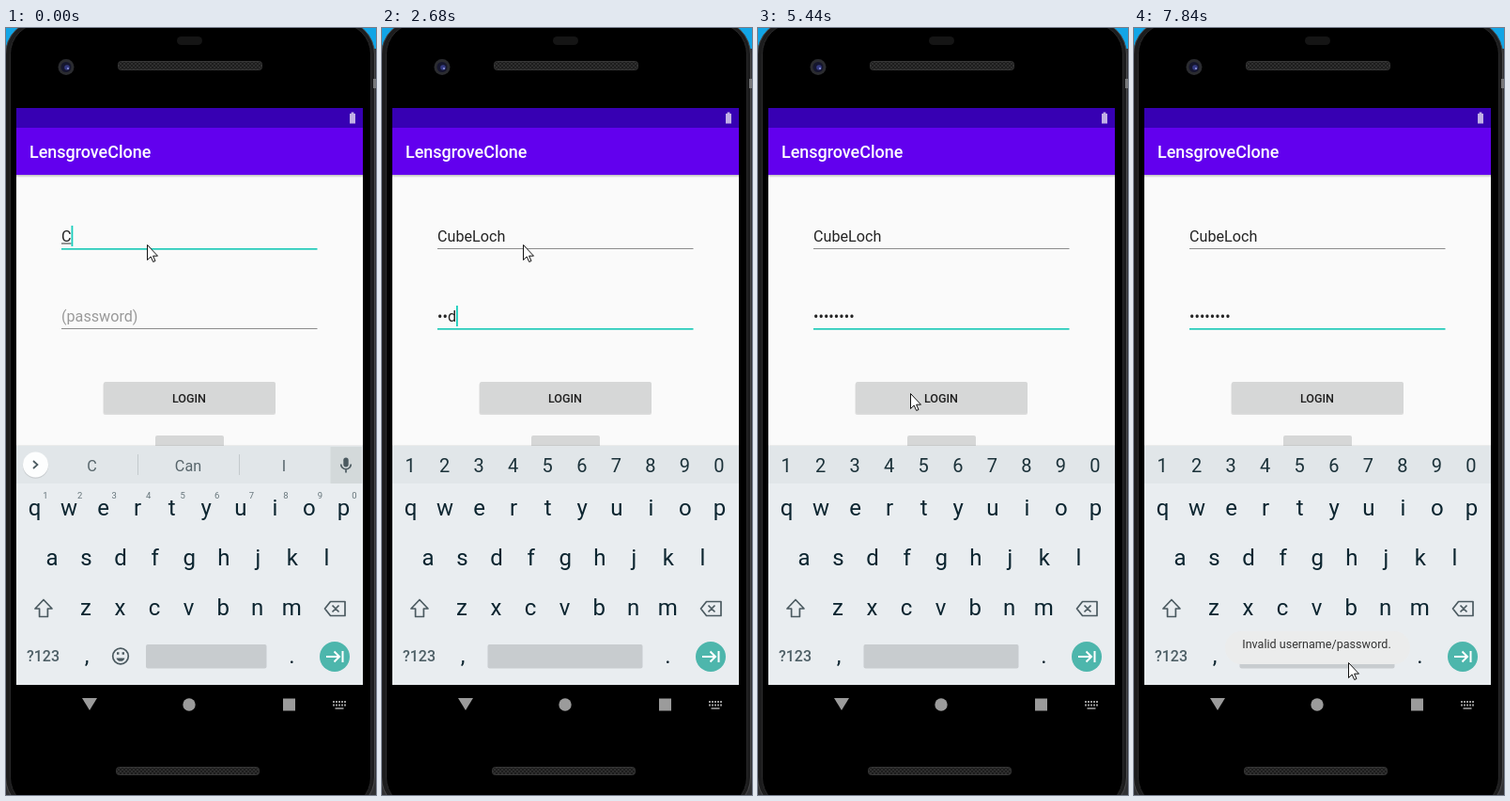
Recreate the animation shown at these times as an HTML page. Size 394x815 px, loop 7.99 s.

```html
<!DOCTYPE html>
<html lang="en">
<head>
<meta charset="utf-8">
<title>Login form</title>
<style>
  html, body { margin: 0; width: 100%; height: 100%; overflow: hidden; background: #000; }
  svg { display: block; width: 100vw; height: 100vh; font-family: Roboto, sans-serif; }
  .mid { text-anchor: middle; }
  .field { font-size: 16.16px; fill: #242424; white-space: pre; }
  .key { font-size: 24px; fill: #0c2530; }
  .digit { font-size: 20px; fill: #1c323a; }
  .hint { font-size: 9.5px; fill: #66757b; }
  .chip { font-size: 16.2px; fill: #57656b; }
  .icon { fill: none; stroke: #4b5a60; stroke-width: 1.7; }
</style>
</head>
<body>
<svg viewBox="0 0 394 815" preserveAspectRatio="none">
  <defs>
    <pattern id="mesh" width="4" height="4" patternUnits="userSpaceOnUse">
      <rect width="4" height="4" fill="#1d1d1d"/>
      <path d="M0 0L4 4M4 0L0 4" stroke="#343434" stroke-width=".8"/>
    </pattern>
    <linearGradient id="drop" x2="0" y2="1">
      <stop stop-color="#000" stop-opacity=".25"/>
      <stop offset="1" stop-color="#000" stop-opacity="0"/>
    </linearGradient>
  </defs>

  <!-- Phone body -->
  <rect width="394" height="815" fill="#303134"/>
  <rect width="394" height="22" fill="#12a5e6"/>
  <rect x="-.5" y="-8" width="393" height="840" rx="36" fill="#1c1c1d" stroke="#4a4a4c"/>
  <rect x="4.5" y="-5" width="384" height="834" rx="33" fill="#000" stroke="#29292a"/>
  <rect x="391" y="54" width="3" height="10" fill="#77787a"/>
  <rect x="182" y="9" width="27" height="9" rx="4.5" fill="#151515"/>
  <g fill="url(#mesh)" stroke="#363636">
    <rect x="119.500" y="35.500" width="153" height="9" rx="3"/>
    <rect x="117.500" y="785.500" width="152" height="8" rx="3"/>
  </g>
  <circle cx="64" cy="41.500" r="8.500" fill="#2b2c30"/>
  <circle cx="64" cy="41.500" r="5.500" fill="#15162d"/>
  <circle cx="65" cy="42" r="2.800" fill="#343a80"/>
  <circle cx="66" cy="43" r="1.100" fill="#8d95dc"/>

  <!-- App -->
  <rect x="11" y="85" width="369" height="613" fill="#fafafa"/>
  <rect x="11" y="85" width="369" height="21" fill="#3700b3"/>
  <path d="M366 91h1.600v-1.500h2.800V91h1.600v10.500h-6z" fill="#c1b0e5"/>
  <rect x="11" y="106" width="369" height="50" fill="#6200ee"/>
  <rect x="11" y="156" width="369" height="3" fill="url(#drop)"/>
  <text x="25" y="138" font-size="17.96" font-weight="500" fill="#fff">LensgroveClone</text>

  <rect id="userLine" x="59"/>
  <text id="user" class="field" x="59" y="227"></text>
  <rect id="compose" x="59" y="228.500" height="1" fill="#333"/>
  <rect id="passLine" x="59"/>
  <text id="pass" class="field" x="59" y="312"></text>
  <rect id="caret" width="1.800" height="22" fill="#18cdbc"/>

  <rect x="103.500" y="377" width="183.500" height="34" rx="2" fill="#000" opacity=".12"/>
  <rect id="login" x="104" y="376" width="183" height="33.500" rx="2"/>
  <text class="mid" x="195" y="397.500" font-size="12.57" font-weight="500" fill="#202020">LOGIN</text>
  <rect x="159" y="433" width="73" height="20" rx="2" fill="#d6d7d7"/>

  <!-- Keyboard -->
  <rect x="11" y="443" width="369" height="2" fill="#000" opacity=".06"/>
  <rect x="11" y="444" width="369" height="40" fill="#e1e6e9"/>
  <rect x="11" y="484" width="369" height="214" fill="#e9edf0"/>
  <g id="keys"></g>
  <g id="wordMode">
    <circle cx="31.500" cy="465" r="13.700" fill="#000" opacity=".1"/>
    <circle cx="31.500" cy="464" r="13.500" fill="#fdfefe"/>
    <path class="icon" d="M29 460l4.500 4-4.500 4"/>
    <path d="M140.500 453v22M248.500 453v22" stroke="#c3cacd"/>
    <rect x="345.500" y="445" width="33.500" height="39" fill="#d3d9da"/>
    <rect x="359.300" y="456.500" width="5.400" height="10" rx="2.700" fill="#4b5a60"/>
    <path class="icon" d="M356.700 463.500a5.300 5.300 0 0 0 10.600 0M362 469v3.500"/>
    <g id="chips"></g>
    <g class="icon">
      <circle cx="122" cy="667.500" r="8.300"/>
      <path d="M117.500 669.500a4.700 4.700 0 0 0 9 0z" fill="#4b5a60" stroke="none"/>
    </g>
    <path d="M118 664.500h2.400M123.600 664.500h2.400" stroke="#4b5a60" stroke-width="2.400"/>
  </g>
  <g id="digitMode"></g>
  <rect id="space" y="655" height="25.500" rx="2" fill="#c8cccf"/>
  <path class="icon" d="M40 607.500l9 9.500h-4.600v8.500h-8.800V617H31z" stroke-linejoin="round"/>
  <path class="icon" d="M345.500 609.500h15.500v15h-15.500l-6-7.500zM347.500 613.500l7 7m0-7l-7 7" stroke-linejoin="round"/>
  <text class="mid" x="39.500" y="673" font-size="16" font-weight="500" fill="#4e5f66">?123</text>
  <text class="mid key" x="86" y="675">,</text>
  <text class="mid key" x="304.500" y="675">.</text>
  <circle cx="350" cy="668" r="16" fill="#4db6ac"/>
  <path d="M341 668h13.500M349.500 662.500l5.500 5.500-5.500 5.500M358.500 662v12" fill="none" stroke="#fff" stroke-width="2"/>

  <!-- Navigation bar -->
  <g fill="#9b9b9b">
    <path d="M81 712h16l-8 13z"/>
    <circle cx="195" cy="719" r="6.700"/>
    <rect x="295" y="712.500" width="13" height="13"/>
  </g>
  <path d="M348 716h14M348 719.500h14" stroke="#9b9b9b" stroke-width="2" stroke-dasharray="2 1"/>
  <path d="M350.500 723h9" stroke="#9b9b9b" stroke-width="1.600"/>

  <g id="toast">
    <rect x="97" y="641" width="197" height="35" rx="17" fill="#ebecec"/>
    <text class="mid" x="194.500" y="659.300" font-size="12.57" fill="#333">Invalid username/password.</text>
  </g>
  <path id="mouse" d="M.5.500V16.500L4.200 13 6.700 18.500 9 17.500 6.600 12.200H11.500z" fill="#fff" stroke="#111"/>
</svg>

<script>
const LOOP = 7990;
const NAME = "CubeLoch", PASSWORD = "sodabath";
const SWITCH = 1700, MASK_ALL = 5440;

// Each track is a list of [start time, value]; a value holds until the next one.
const nameLength = [[0, 1], [120, 2], [280, 3], [580, 4], [860, 6], [1010, 7], [1130, 8]];
const passLength = [[0, 0], [2270, 1], [2540, 2], [2680, 3], [3180, 4], [3580, 5], [3700, 6], [3850, 7], [3970, 8]];
const caretOn = [[0, true], [4500, false], [4930, true], [5440, false], [5990, true], [6520, false], [7060, true], [7600, false]];
const pressed = [[0, false], [5990, true], [6110, false]];
const toastAlpha = [[0, 0], [6660, 0.2], [6780, 0.6], [6900, 0.9], [7060, 1]];
const pointer = [
  [0, [150, 230]], [4780, [165, 280]], [4930, [161, 347]], [5050, [161, 372]],
  [5170, [161, 381]], [5320, [162, 388]], [7200, [163, 420]], [7330, [171, 556]],
  [7480, [190, 620]], [7600, [215, 655]], [7720, [226, 670]], [7840, [228, 674]]
];
const suggestions = [
  [0, ["C", "Can", "I"]],
  [120, ["Cu", "Cut", "Cute"]],
  [430, ["Cub", "Cube", "Cubs"]],
  [580, ["Cube", "Cubes", "Cubed"]],
  [860, ["CubeLo", "CubeLoch", "Cubelo"]],
  [1010, ["CubeLoc", "CubeLoch", "Cubeloc"]],
  [1130, ["CubeLoch", "CubeLochs", "Cubeloch"]]
];

const $ = id => document.getElementById(id);
const ui = {};
for (const el of document.querySelectorAll("svg [id]")) ui[el.id] = el;

function at(track, t) {
  let value = track[0][1];
  for (const [start, v] of track) if (t >= start) value = v;
  return value;
}

function set(el, attrs) {
  for (const name in attrs) el.setAttribute(name, attrs[name]);
}

function show(el, on) {
  el.style.display = on ? "" : "none";
}

function write(el, text) {
  if (el.textContent !== text) el.textContent = text;
}

function addText(parent, text, x, y, cls) {
  const el = document.createElementNS("http://www.w3.org/2000/svg", "text");
  set(el, { x, y, class: "mid " + cls });
  el.textContent = text;
  parent.appendChild(el);
  return el;
}

function addRow(parent, chars, x, y, cls) {
  [...chars].forEach((c, i) => addText(parent, c, x + 36.55 * i, y, cls));
}

addRow(ui.keys, "qwertyuiop", 30.5, 518, "key");
addRow(ui.keys, "asdfghjkl", 49, 571, "key");
addRow(ui.keys, "zxcvbnm", 85, 624, "key");
addRow(ui.wordMode, "1234567890", 42, 500, "hint");
addRow(ui.digitMode, "1234567890", 30, 472, "digit");
const chips = [91.5, 194, 296].map(x => addText(ui.chips, "", x, 470.5, "chip"));

function drawLine(el, y, focused) {
  set(el, {
    y, width: 272.5,
    height: focused ? 1.7 : 1,
    fill: focused ? "#22cbb9" : "#8c8c8c"
  });
}

function masked(n, t) {
  const dots = t < MASK_ALL ? n - 1 : n;
  return "•".repeat(dots) + PASSWORD.slice(dots, n);
}

function draw(t) {
  const onPass = t >= SWITCH;
  const typed = at(passLength, t);

  write(ui.user, NAME.slice(0, at(nameLength, t)));
  write(ui.pass, typed ? masked(typed, t) : "(password)");
  ui.pass.style.fill = typed ? "" : "#999";
  drawLine(ui.userLine, 234, !onPass);
  drawLine(ui.passLine, 319, onPass);

  const nameWidth = ui.user.getComputedTextLength();
  const passWidth = typed ? ui.pass.getComputedTextLength() : 0;
  set(ui.compose, { width: nameWidth });
  show(ui.compose, !onPass);
  set(ui.caret, { x: 59 + (onPass ? passWidth : nameWidth), y: onPass ? 295 : 210 });
  show(ui.caret, at(caretOn, t));

  set(ui.login, { fill: at(pressed, t) ? "#babbbb" : "#d6d7d7" });
  show(ui.wordMode, !onPass);
  show(ui.digitMode, onPass);
  set(ui.space, onPass ? { x: 112.5, width: 165 } : { x: 149, width: 128.5 });
  at(suggestions, t).forEach((word, i) => write(chips[i], word));

  set(ui.toast, { opacity: at(toastAlpha, t) });
  set(ui.mouse, { transform: `translate(${at(pointer, t)})` });
}

function tick() {
  draw(performance.now() % LOOP);
  requestAnimationFrame(tick);
}
tick();
</script>
</body>
</html>
```
